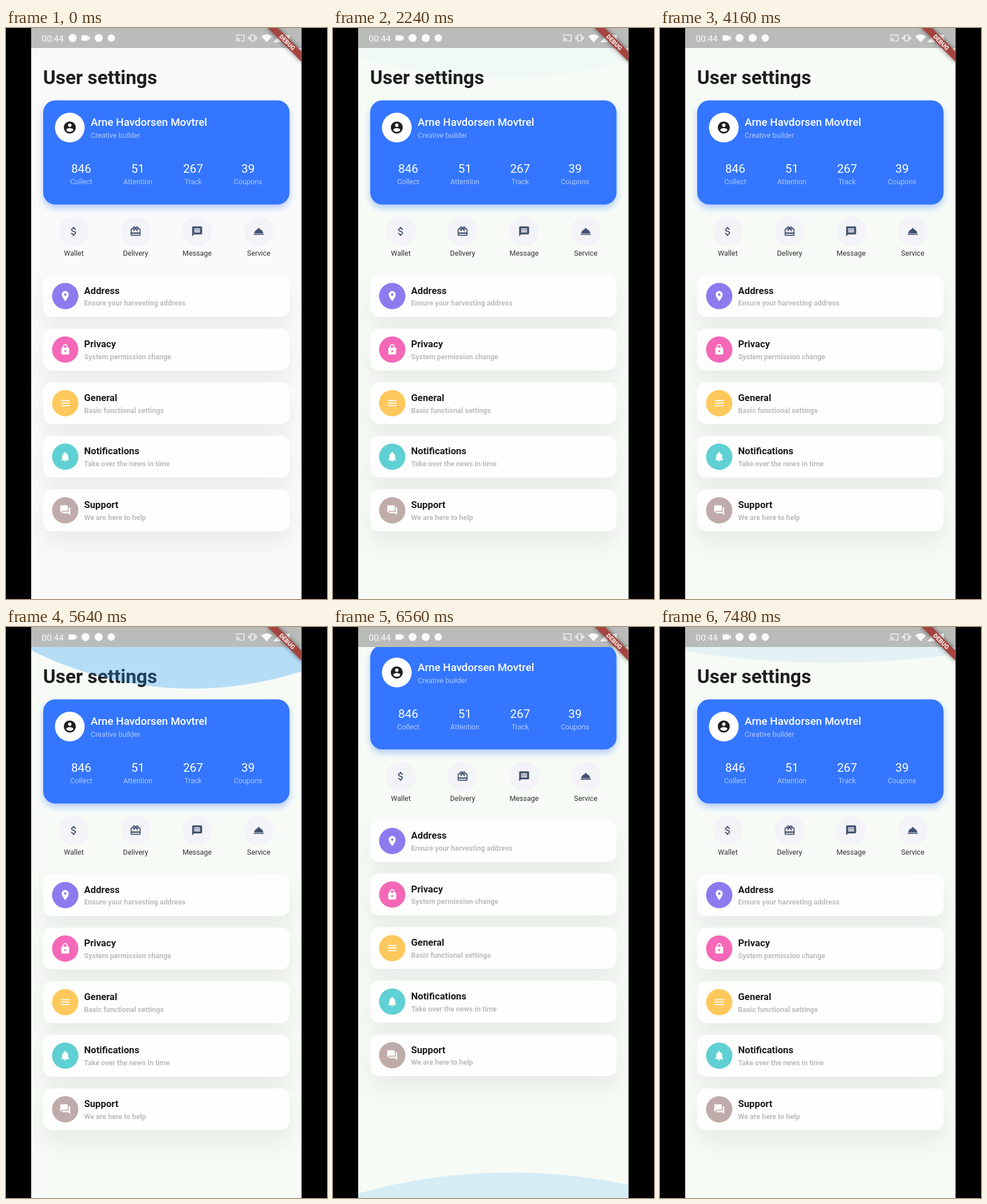
An HTML page for the animation above (7.52 s loop, 561x998 px).

```html
<!DOCTYPE html>
<html lang="en">
<head>
<meta charset="utf-8">
<title>User settings</title>
<style>
  html, body { margin: 0; height: 100%; overflow: hidden; background: #000; }
  svg { display: block; width: 100vw; height: 100vh; font-family: Roboto, sans-serif; }
  .mid { text-anchor: middle; }
  .small { font-size: 12.5px; }
  .bold { font-weight: 700; }
  .soft { fill: rgba(255, 255, 255, .6); }
  .profile { filter: drop-shadow(0 6px 6px rgba(57, 119, 255, .36)); }
  .tile { filter: drop-shadow(0 22px 18px rgba(0, 0, 0, .06)); }
  .banner { filter: drop-shadow(0 0 4px rgba(0, 0, 0, .5)); }
</style>
</head>
<body>
<svg viewBox="0 0 561 998" preserveAspectRatio="none">
  <defs>
    <clipPath id="phone"><rect x="44" width="472.5" height="998"/></clipPath>
    <clipPath id="viewport"><rect x="44" y="35" width="472.5" height="963"/></clipPath>
  </defs>
  <rect width="561" height="998"/>
  <g clip-path="url(#phone)">
    <rect id="page" x="44" width="473" height="998"/>
    <g clip-path="url(#viewport)">
      <g id="content"></g>
      <ellipse id="topGlow" rx="708" fill="#2196f3"/>
      <ellipse id="bottomGlow" rx="708" fill="#2196f3"/>
    </g>
    <rect x="44" width="473" height="35" opacity=".25"/>
    <g id="status" fill="#fff" opacity=".93"></g>
    <g transform="translate(516.5 0) rotate(45)">
      <rect class="banner" x="-43" y="29.2" width="86" height="12.5" fill="#a5443f"/>
      <text class="mid" y="39.2" font-size="10.6" font-weight="900" fill="#fff" fill-opacity=".9">DEBUG</text>
    </g>
  </g>
</svg>
<script>
const LOOP = 7520, VIEW_TOP = 35, VIEW_BOTTOM = 998;
const $ = id => document.getElementById(id);

// Icon outlines on a 24-unit grid
const icons = {
  account: 'M12 2C6.48 2 2 6.48 2 12s4.48 10 10 10 10-4.48 10-10S17.52 2 12 2zm0 3c1.66 0 3 1.34 3 3s-1.34 3-3 3-3-1.34-3-3 1.34-3 3-3zm0 14.2c-2.5 0-4.71-1.28-6-3.22.03-1.99 4-3.08 6-3.08 1.99 0 5.97 1.09 6 3.08-1.29 1.94-3.5 3.22-6 3.22z',
  money: 'M11.8 10.9c-2.27-.59-3-1.2-3-2.15 0-1.09 1.01-1.85 2.7-1.85 1.78 0 2.44.85 2.5 2.1h2.21c-.07-1.72-1.12-3.3-3.21-3.81V3h-3v2.16c-1.94.42-3.5 1.68-3.5 3.61 0 2.31 1.91 3.46 4.7 4.13 2.5.6 3 1.48 3 2.41 0 .69-.49 1.79-2.7 1.79-2.06 0-2.87-.92-2.98-2.1h-2.2c.12 2.19 1.76 3.42 3.68 3.83V21h3v-2.15c1.95-.37 3.5-1.5 3.5-3.55 0-2.84-2.43-3.81-4.7-4.4z',
  gift: 'M20 6h-2.18c.11-.31.18-.65.18-1 0-1.66-1.34-3-3-3-1.05 0-1.96.54-2.5 1.35l-.5.67-.5-.68C10.96 2.54 10.05 2 9 2 7.34 2 6 3.34 6 5c0 .35.07.69.18 1H4c-1.11 0-1.99.89-1.99 2L2 19c0 1.11.89 2 2 2h16c1.11 0 2-.89 2-2V8c0-1.11-.89-2-2-2zm-5-2c.55 0 1 .45 1 1s-.45 1-1 1-1-.45-1-1 .45-1 1-1zM9 4c.55 0 1 .45 1 1s-.45 1-1 1-1-.45-1-1 .45-1 1-1zm11 15H4v-2h16v2zm0-5H4V8h5.08L7 10.83 8.62 12 11 8.76l1-1.36 1 1.36L15.38 12 17 10.83 14.92 8H20v6z',
  message: 'M20 2H4c-1.1 0-1.99.9-1.99 2L2 22l4-4h14c1.1 0 2-.9 2-2V4c0-1.1-.9-2-2-2zm-2 12H6v-2h12v2zm0-3H6V9h12v2zm0-3H6V6h12v2z',
  service: 'M2 17h20v2H2zm11.84-9.21c.1-.24.16-.51.16-.79 0-1.1-.9-2-2-2s-2 .9-2 2c0 .28.06.55.16.79C6.25 8.6 3.27 11.93 3 16h18c-.27-4.07-3.25-7.4-7.16-8.21z',
  place: 'M12 2C8.13 2 5 5.13 5 9c0 5.25 7 13 7 13s7-7.75 7-13c0-3.87-3.13-7-7-7zm0 9.5c-1.38 0-2.5-1.12-2.5-2.5s1.12-2.5 2.5-2.5 2.5 1.12 2.5 2.5-1.12 2.5-2.5 2.5z',
  lock: 'M18 8h-1V6c0-2.76-2.24-5-5-5S7 3.24 7 6v2H6c-1.1 0-2 .9-2 2v10c0 1.1.9 2 2 2h12c1.1 0 2-.9 2-2V10c0-1.1-.9-2-2-2zm-6 9c-1.1 0-2-.9-2-2s.9-2 2-2 2 .9 2 2-.9 2-2 2zm3.1-9H8.9V6c0-1.71 1.39-3.1 3.1-3.1 1.71 0 3.1 1.39 3.1 3.1v2z',
  menu: 'M3 18h18v-2H3v2zm0-5h18v-2H3v2zm0-7v2h18V6H3z',
  bell: 'M12 22c1.1 0 2-.9 2-2h-4c0 1.1.89 2 2 2zm6-6v-5c0-3.07-1.64-5.64-4.5-6.32V4c0-.83-.67-1.5-1.5-1.5s-1.5.67-1.5 1.5v.68C7.63 5.36 6 7.92 6 11v5l-2 2v1h16v-1l-2-2z',
  chat: 'M21 6h-2v9H6v2c0 .55.45 1 1 1h11l4 4V7c0-.55-.45-1-1-1zm-4 6V3c0-.55-.45-1-1-1H3c-.55 0-1 .45-1 1v14l4-4h10c.55 0 1-.45 1-1z',
  video: 'M17 10.5V7c0-.55-.45-1-1-1H4c-.55 0-1 .45-1 1v10c0 .55.45 1 1 1h12c.55 0 1-.45 1-1v-3.5l4 4v-11l-4 4z',
  cast: 'M21 3H3c-1.1 0-2 .9-2 2v3h2V5h18v14h-7v2h7c1.1 0 2-.9 2-2V5c0-1.1-.9-2-2-2zM1 18v3h3c0-1.66-1.34-3-3-3zm0-4v2c2.76 0 5 2.24 5 5h2c0-3.87-3.13-7-7-7zm0-4v2c4.97 0 9 4.03 9 9h2c0-6.08-4.93-11-11-11z',
  vibrate: 'M0 15h2V9H0v6zm3 2h2V7H3v10zm19-8v6h2V9h-2zm-3 8h2V7h-2v10zM16.5 3h-9C6.67 3 6 3.67 6 4.5v15c0 .83.67 1.5 1.5 1.5h9c.83 0 1.5-.67 1.5-1.5v-15c0-.83-.67-1.5-1.5-1.5zM16 19H8V5h8v14z'
};

const icon = (name, cx, cy, size, fill) =>
  `<path d="${icons[name]}" fill="${fill}" transform="translate(${cx - size / 2} ${cy - size / 2}) scale(${size / 24})"/>`;
const disc = (cx, cy, r, fill) => `<circle cx="${cx}" cy="${cy}" r="${r}" fill="${fill}"/>`;
const label = (text, x, y, attrs) => `<text x="${x}" y="${y}" ${attrs}>${text}</text>`;

const stats = [['846', 'Collect', 131.5], ['51', 'Attention', 230.5], ['267', 'Track', 327], ['39', 'Coupons', 423]];
const actions = [['Wallet', 'money', 118.5], ['Delivery', 'gift', 226.5], ['Message', 'message', 334], ['Service', 'service', 441.7]];
const settings = [
  ['Address', 'Ensure your harvesting address', 'place', '#8d7aee'],
  ['Privacy', 'System permission change', 'lock', '#f468b7'],
  ['General', 'Basic functional settings', 'menu', '#fec85c'],
  ['Notifications', 'Take over the news in time', 'bell', '#5fd0d3'],
  ['Support', 'We are here to help', 'chat', '#bfacaa']
];

$('content').innerHTML =
  label('User settings', 64.8, 98, 'class="bold" font-size="33.4" fill="#1f1f1f"') +
  '<rect class="profile" x="65" y="126.5" width="430.5" height="182" rx="21" fill="#3476ff"/>' +
  disc(111.5, 174, 26, '#fff') + icon('account', 111.5, 174, 25, '#1f1f1f') +
  label('Arne Havdorsen Movtrel', 148, 171, 'font-size="18.8" font-weight="500" fill="#fff"') +
  label('Creative builder', 148, 192, 'class="small soft"') +
  stats.map(([count, name, x]) =>
    label(count, x, 253, 'class="mid" font-size="20.9" fill="#fff"') +
    label(name, x, 273.3, 'class="mid small soft"')).join('') +
  actions.map(([name, glyph, x]) =>
    disc(x, 355.5, 26, '#f4f3f7') + icon(glyph, x, 355.5, 20.9, '#42526f') +
    label(name, x, 398, 'class="mid small" fill="#323232"')).join('') +
  settings.map(([title, note, glyph, color], i) => {
    const top = 432 + 93.6 * i;
    return `<rect class="tile" x="65" y="${top}" width="430.5" height="73" rx="15.7" fill="#fdfefd"/>` +
      disc(103.5, top + 36.5, 23, color) + icon(glyph, 103.5, top + 36.5, 20.9, '#fff') +
      label(title, 136.5, top + 32.6, 'class="bold" font-size="16.7" fill="#1c1c1c"') +
      label(note, 136.5, top + 53.3, 'class="bold small" fill="rgba(0,0,0,.26)"');
  }).join('');

$('status').innerHTML =
  label('00:44', 62.5, 23.5, 'font-size="15.4"') +
  `<g id="video">${icon('video', 0, 17.5, 19, '#fff')}</g><g id="dot">${disc(0, 17.5, 7, '#fff')}</g>` +
  disc(162, 17.5, 7, '#fff') + disc(184, 17.5, 6.5, '#fff') +
  icon('cast', 409.5, 17.5, 16, '#fff') + icon('vibrate', 431, 17.5, 16, '#fff') +
  '<path d="M446 14.5Q455.5 7.500 465 14.500L455.500 25zM467 25L480 11V25zM487 12h9v13h-9z"/>';

// Eased value between [time, value] keys
function track(t, keys) {
  if (t <= keys[0][0]) return keys[0][1];
  for (let i = 1; i < keys.length; i++) {
    const [t0, a] = keys[i - 1], [t1, b] = keys[i];
    if (t < t1) {
      const p = (t - t0) / (t1 - t0);
      return a + (b - a) * p * p * (3 - 2 * p);
    }
  }
  return keys[keys.length - 1][1];
}

const topOpacity = [[2000, 0], [2120, .025], [2240, .02], [2480, 0], [4840, 0], [5360, .3], [5680, .3], [5960, 0], [7320, 0], [7520, .09]];
const topSize = [[2000, .3], [2160, .9], [2480, .5], [4840, 0], [5520, 1.15], [5680, 1.15], [5960, .3], [7320, .1], [7520, .47]];
const topCenter = [[2480, 290], [4840, 325], [5960, 325], [7320, 298]];
const bottomOpacity = [[6080, 0], [6280, .25], [6400, .25], [6760, 0]];
const bottomSize = [[6080, 0], [6320, 1], [6400, 1], [6760, .3]];
const scroll = [[5760, 0], [6030, 94.5], [6560, 94.5], [6880, 0]];

function setGlow(glow, cx, edge, direction, size, opacity) {
  glow.setAttribute('cx', cx);
  glow.setAttribute('cy', edge + direction * (63.2 - 708) * size);
  glow.setAttribute('ry', 708 * size);
  glow.setAttribute('opacity', opacity);
}

function draw(now) {
  const t = now % LOOP;
  const tint = track(t, [[40, 0], [440, 1]]);
  $('page').setAttribute('fill', `rgb(${250 - 4 * tint},${250 + tint},${250 - 4 * tint})`);
  $('content').setAttribute('transform', `translate(0 ${-track(t, scroll)})`);
  setGlow($('topGlow'), track(t, topCenter), VIEW_TOP, 1, track(t, topSize), track(t, topOpacity));
  setGlow($('bottomGlow'), 310, VIEW_BOTTOM, -1, track(t, bottomSize), track(t, bottomOpacity));
  const swapped = t >= 800;
  $('video').setAttribute('transform', `translate(${swapped ? 116.5 : 139} 0)`);
  $('dot').setAttribute('transform', `translate(${swapped ? 139 : 116.5} 0)`);
  requestAnimationFrame(() => draw(performance.now()));
}
draw(0);
</script>
</body>
</html>
```
